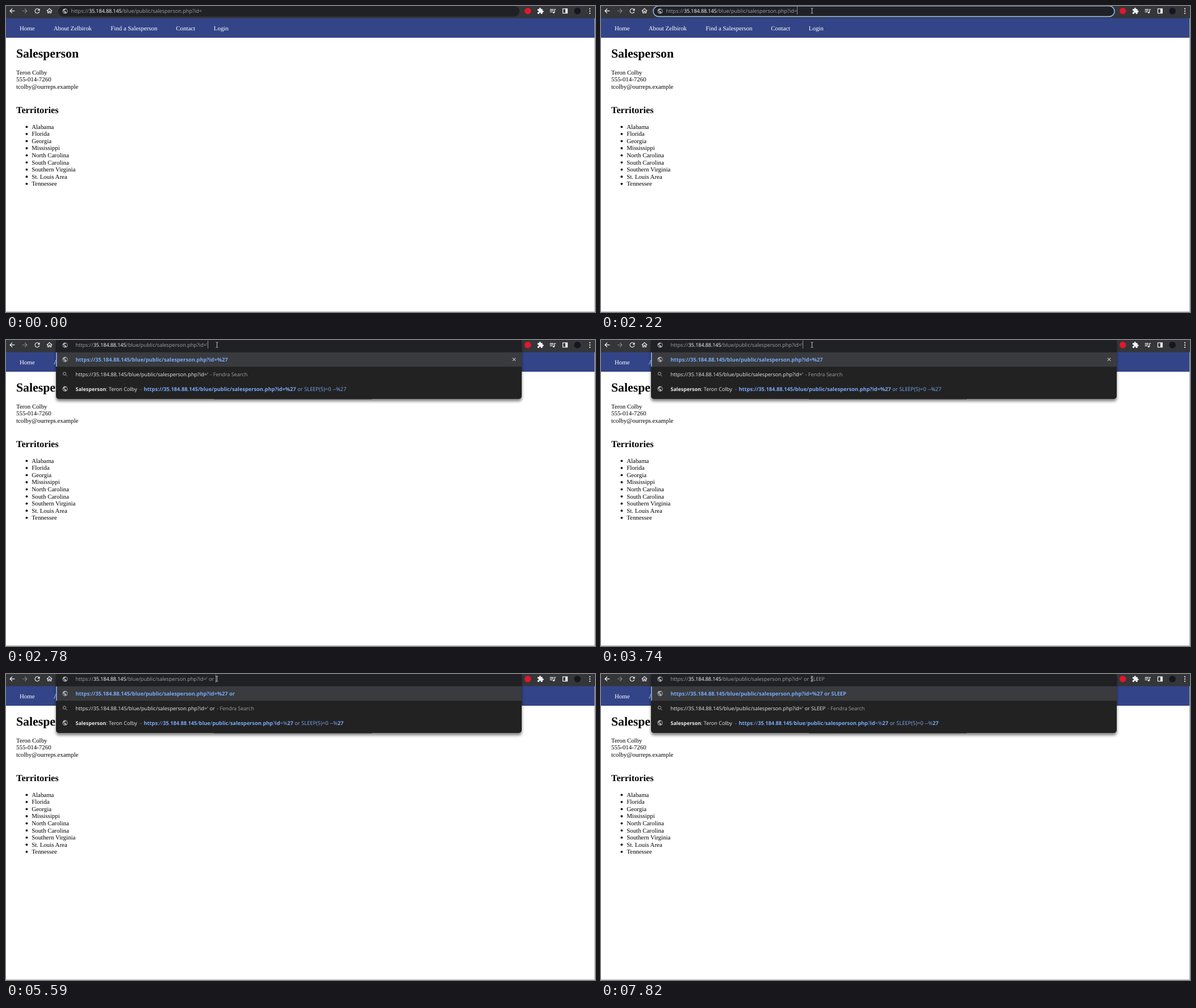
An HTML page for the animation above (8000 ms loop, 1037 by 540 pixels).

```html
<!DOCTYPE html>
<html lang="en">
<head>
<meta charset="utf-8">
<title>Salesperson</title>
<style>
html, body { margin: 0; width: 100%; height: 100%; overflow: hidden; background: #fff; }
svg { display: block; width: 100%; height: 100%; }
text { white-space: pre; text-rendering: geometricPrecision; }
.page { font: 10.88px "Liberation Serif", serif; fill: #000; }
.nav { fill: #fff; }
.h1 { font-size: 21.76px; font-weight: 700; }
.h2 { font-size: 16.32px; font-weight: 700; }
.ui { font: 9.1px "Open Sans", sans-serif; fill: #e8eaed; }
.dim { fill: #9aa0a6; }
.link { fill: #7aa9f8; }
.bold { font-weight: 700; font-size: 9.25px; }
.host { fill: #fff; letter-spacing: -.12px; }
</style>
</head>
<body>
<svg id="stage" viewBox="0 0 1037 540" xmlns="http://www.w3.org/2000/svg"></svg>
<script>
const LOOP = 8000;
const URL_PATH = '/blue/public/salesperson.php?id=';
const HOST = '35.184.88.145';
const FULL_URL = 'https://' + HOST + URL_PATH;

// [time, typed text, caret x]
const typing = [
  [0, '', 345], [2630, "'", 355], [4910, "' ", 358], [5160, "' o", 363],
  [5310, "' or", 367], [5590, "' or ", 369], [6420, "' or S", 374],
  [6570, "' or SL", 379], [6700, "' or SLE", 384], [6980, "' or SLEE", 389],
  [7260, "' or SLEEP", 394]
];
// [time, caret visible]
const blinks = [
  [0, 0], [1130, 1], [1690, 0], [2220, 1], [3180, 0], [3740, 1],
  [4300, 0], [4760, 1], [6140, 0], [6420, 1], [7820, 0]
];
// [time, pointer kind, x, y]
const moves = [
  [0, '', 0, 0], [300, 'arrow', 87, 18], [420, 'beam', 190, 11],
  [540, 'beam', 283.7, 7.7], [690, 'beam', 322.4, 15.8], [840, 'beam', 329.8, 14.6],
  [990, 'beam', 362.8, 13.6], [1280, 'beam', 368, 10.8], [1410, 'beam', 371.5, 8.5]
];

const text = (x, y, cls, str, id = '') =>
  `<text x="${x}" y="${y}" class="${cls}"${id && ` id="${id}"`}>${str}</text>`;
const rect = (x, y, w, h, fill, more = '') =>
  `<rect x="${x}" y="${y}" width="${w}" height="${h}" fill="${fill}" ${more}/>`;
const span = (cls, str) => `<tspan class="${cls}">${str}</tspan>`;

// Icons live on a 24 unit grid centred on (x, y)
const icon = (x, y, size, d, color, line = 0) =>
  `<path transform="translate(${x} ${y}) scale(${size / 24}) translate(-12 -12)" d="${d}" ` +
  (line ? `fill="none" stroke="${color}" stroke-width="${line}"/>` : `fill="${color}"/>`);

const GLOBE = 'M12 2a10 10 0 1 0 0 20a10 10 0 0 0 0-20zm-1 17.9A8 8 0 0 1 4.2 10.2L9 15v1' +
  'a2 2 0 0 0 2 2zm6.9-2.5A2 2 0 0 0 16 16h-1v-3a1 1 0 0 0-1-1H8v-2h2a1 1 0 0 0 1-1V7h2' +
  'a2 2 0 0 0 2-2v-.4a8 8 0 0 1 2.9 12.8z';
const RELOAD = 'M17.65 6.35A8 8 0 1 0 19.73 14h-2.08A6 6 0 1 1 16.22 7.78L13 11h7V4z';
const PUZZLE = 'M20.5 11H19V7a2 2 0 0 0-2-2h-4V3.5a2.5 2.5 0 0 0-5 0V5H4a2 2 0 0 0-2 2v3.8h1.5' +
  'a2.7 2.7 0 0 1 0 5.4H2V20a2 2 0 0 0 2 2h3.8v-1.5a2.7 2.7 0 0 1 5.4 0V22H17a2 2 0 0 0 2-2v-4' +
  'h1.5a2.5 2.5 0 0 0 0-5z';
const globe = y => icon(104, y, 11, GLOBE, '#aeb1b5');

function page() {
  const nav = [['Home', 24], ['About Zelbirok', 83.7], ['Find a Salesperson', 184.3],
    ['Contact', 299.3], ['Login', 365.8]];
  const details = ['Teron Colby', '555-014-7260', 'tcolby@ourreps.example'];
  const areas = ['Alabama', 'Florida', 'Georgia', 'Mississippi', 'North Carolina',
    'South Carolina', 'Southern Virginia', 'St. Louis Area', 'Tennessee'];
  return rect(0, 0, 1037, 540, '#fff') +
    rect(0, 21, 1037, 35, '#334588') +
    rect(1036, 21, 1, 519, '#a9abb0') + rect(0, 539, 1037, 1, '#b4b4b4') +
    nav.map(([s, x]) => text(x, 43.2, 'page nav', s)).join('') +
    text(18, 90.8, 'page h1', 'Salesperson') +
    details.map((s, i) => text(18, 120.7 + 12.56 * i, 'page', s)).join('') +
    text(18, 189.3, 'page h2', 'Territories') +
    areas.map((s, i) => {
      const y = 216.7 + 12.56 * i;
      return `<circle cx="36.4" cy="${y - 3.4}" r="1.9"/>` + text(45.2, y, 'page', s);
    }).join('');
}

function toolbar() {
  const white = '#f1f3f4';
  return rect(0, 0, 1037, 21.5, '#35363a') +
    icon(11, 8.7, 13, 'M20 12H5M12 4.7L4.7 12l7.3 7.3', white, 2.3) +
    icon(33, 8.7, 13, 'M4 12h15M12 4.7l7.3 7.3l-7.3 7.3', '#85878b', 2.1) +
    icon(55, 8.7, 13.5, RELOAD, white) +
    icon(76.5, 8.7, 12, 'M2.5 12.2L12 3.7l9.5 8.5M6 10v9h4v-6h4v6h4v-9', white, 2.2) +
    '<circle cx="918.7" cy="8.8" r="5.7" fill="#e0182d"/>' +
    icon(941, 8.8, 12.5, PUZZLE, white) +
    icon(962.5, 8.8, 13, 'M3 7h12M3 11h12M3 15h8M22 7h-4v10', white, 2) +
    '<circle cx="964.2" cy="11.5" r="1.6" fill="' + white + '"/>' +
    rect(980.4, 4.9, 7.8, 7.8, 'none', `stroke="${white}" stroke-width="1.2"`) +
    rect(984.8, 4.9, 3.6, 7.8, white) +
    '<circle cx="1006" cy="8.9" r="5.8" fill="#15161f"/>' +
    [4.8, 8.8, 12.8].map(y => `<circle cx="1028" cy="${y}" r="1.15" fill="${white}"/>`).join('');
}

const pill = rect(92, 0, 812, 18.6, '#202124', 'id="pill" rx="9.3" stroke="#8fb6f5" stroke-width="0"');

function popup() {
  const shape = 'M88 0H908V99a5 5 0 0 1-5 5H93a5 5 0 0 1-5-5z';
  return `<g id="list"><path d="${shape}" fill="#202124" filter="url(#shadow)"/>` +
    rect(366, 104, 278, 1, '#55565a') +
    rect(88, 21.5, 820, 25.7, '#393b3e') + rect(88, 22, 1.6, 25, '#8ab4f8') +
    globe(34.3) + globe(86.2) +
    icon(104, 60.5, 10.5, 'M14.5 14.5L20 20M15.5 9.5a6 6 0 1 0-12 0a6 6 0 0 0 12 0', '#aeb1b5', 2.2) +
    `<path id="close" d="M892 31.7l5.2 5.2m0-5.2l-5.2 5.2" stroke="#c4c7cb" stroke-width="1.1"/>` +
    text(122.5, 37.6, 'ui link bold', '', 'row1') +
    text(122.5, 63.7, 'ui', '', 'row2') +
    text(122.5, 89.5, 'ui bold', 'Salesperson').replace('>S', ' style="font-size:8.95px">S') +
    text(176, 89.5, 'ui', ': Teron Colby') + text(236, 89.5, 'ui dim', '-') +
    text(242.5, 89.5, 'ui link', '', 'row3') + '</g>' +
    `<g id="field">${rect(88, 0, 820, 21.5, '#202124')}</g>`;
}

const address = `<g id="address">${globe(9)}</g><g id="url">` +
  text(114.6, 12.3, 'ui dim', 'https://') + text(145.9, 12.3, 'ui host', HOST) +
  text(203.7, 12.3, 'ui dim', URL_PATH) + text(344.7, 12.3, 'ui dim', '', 'tail') + '</g>' +
  rect(0, 1, 1, 14, '#8d9094', 'id="caret"');

const pointers =
  '<path id="beam" d="M-2-4.5h1.4L0-4L.6-4.5H2M0-4V4M-2 4.5h1.4L0 4l.6.5H2" fill="none" stroke="#d0d2d5" stroke-width=".9"/>' +
  '<path id="arrow" d="M0 0v10.5l2.4-2.3l1.6 3.5l1.5-.7l-1.6-3.4h3.3z" fill="#fff" stroke="#000" stroke-width=".6"/>';

const stage = document.getElementById('stage');
stage.innerHTML = '<defs><filter id="shadow" x="-5%" y="-20%" width="110%" height="150%">' +
  '<feDropShadow dx="0" dy="4" stdDeviation="2.8" flood-color="#000" flood-opacity=".5"/></filter></defs>' +
  page() + toolbar() + pill + popup() + address + pointers;

const el = {};
stage.querySelectorAll('[id]').forEach(n => { el[n.id] = n; });
const show = (node, on) => node.setAttribute('visibility', on ? 'visible' : 'hidden');
const at = (list, t) => list.reduce((last, step) => step[0] <= t ? step : last);

// Word matches are bold once the query has more than one term
function historyUrl(split) {
  const tail = ' or SLEEP(5)=0 --%';
  const url = FULL_URL + '%27';
  const big = s => `<tspan style="font-size:9.35px">${s}</tspan>`;
  if (!split) return span('bold', url) + big(tail + '27');
  return url.replace(/\w+/g, w => span('bold', w)) + big(tail) + span('bold', '27');
}

let typedNow = null;
function setTyped(typed) {
  if (typed === typedNow) return;
  typedNow = typed;
  const query = typed.trim();
  const many = query.length > 1;
  el.tail.textContent = typed;
  el.row1.textContent = FULL_URL + '%27' + query.slice(1);
  el.row2.innerHTML = FULL_URL + query + '<tspan class="dim" dx="1"> - Fendra Search</tspan>';
  el.row3.innerHTML = historyUrl(many);
  el.close.style.display = many ? 'none' : '';
}

function draw(t) {
  const [, typed, caretX] = at(typing, t);
  const [, kind, x, y] = at(moves, t);
  const open = t >= 2630;
  setTyped(typed);
  show(el.list, open);
  show(el.field, open);
  el.list.setAttribute('opacity', t < 2780 ? .63 : 1);
  el.pill.setAttribute('stroke-width', t >= 1130 && !open ? 1.6 : 0);
  el.url.setAttribute('transform', `translate(${open ? 7.9 : 0} 0)`);
  el.caret.setAttribute('x', caretX);
  show(el.caret, at(blinks, t)[1]);
  for (const name of ['beam', 'arrow']) {
    show(el[name], kind === name);
    el[name].setAttribute('transform', `translate(${x} ${y})`);
  }
}

const start = performance.now();
function tick() {
  draw((performance.now() - start) % LOOP);
  requestAnimationFrame(tick);
}
tick();
</script>
</body>
</html>
```
